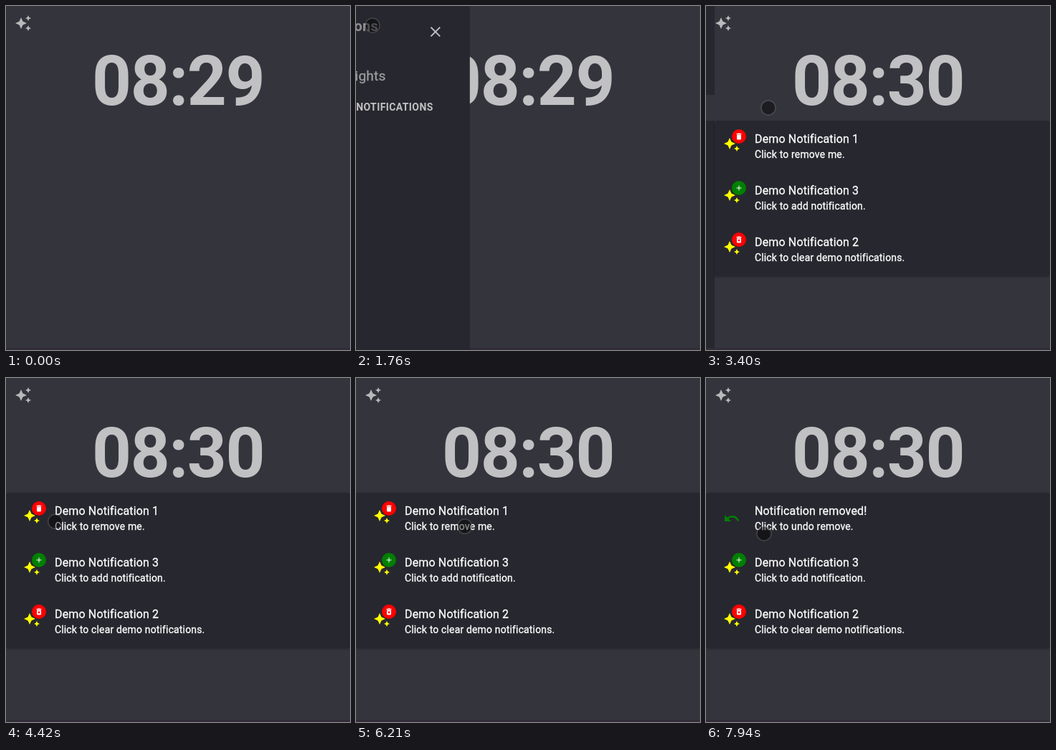
Recreate the animation shown at these times as an HTML page with a canvas. Size 480 by 480 pixels, loop 8000 ms.

```html
<!DOCTYPE html>
<html lang="en">
<head>
<meta charset="utf-8">
<title>Clock with notifications</title>
<style>
  html, body { margin: 0; width: 100%; height: 100%; overflow: hidden; background: #34343d; }
  canvas { display: block; width: 480px; height: 480px; }
</style>
</head>
<body>
<canvas id="stage" width="480" height="480"></canvas>
<script>
const ctx = document.getElementById('stage').getContext('2d');
const LOOP = 8000;
const BACK = '#34343d', PANEL = '#27272f', PALE = '#c1c1c3', GREEN = '#008000', RED = '#f00';
const ROW_TOP = 160, ROW_HEIGHT = 72, DRAWER = 300;

// Moments of the story in ms
const APPEAR = 200, OPEN = 1711, NEXT_MINUTE = 2160, CLOSE = 2800, LIST = 2900, SETTLED = 4070, REMOVED = 6450, PRESS = 6557;

const clamp = v => Math.max(0, Math.min(1, v));
const progress = (t, start, length) => clamp((t - start) / length);
const easeOut = (k, power = 3) => 1 - (1 - k) ** power;
const smooth = k => k * k * (3 - 2 * k);

function setFont(size, weight, spacing) {
  ctx.font = `${weight} ${size}px Roboto, sans-serif`;
  ctx.letterSpacing = spacing + 'px';
}

function text(str, x, y, size, weight, color, spacing = 0.15) {
  setFont(size, weight, spacing);
  ctx.fillStyle = ctx.strokeStyle = color;
  ctx.fillText(str, x, y);
  // Regular text gets a hairline so that it reads a little heavier
  if (weight === 400) {
    ctx.lineWidth = 0.3;
    ctx.strokeText(str, x, y);
  }
}

function centered(str, x, y, size, weight, color, spacing) {
  setFont(size, weight, spacing);
  text(str, x - ctx.measureText(str).width / 2, y, size, weight, color, spacing);
}

function box(x, y, w, h, r, color) {
  ctx.fillStyle = color;
  ctx.beginPath();
  ctx.roundRect(x, y, w, h, r);
  ctx.fill();
}

function disc(x, y, r, color) {
  ctx.fillStyle = color;
  ctx.beginPath();
  ctx.arc(x, y, r, 0, Math.PI * 2);
  ctx.fill();
}

function polygon(points, color) {
  ctx.fillStyle = color;
  ctx.beginPath();
  points.forEach(([x, y]) => ctx.lineTo(x, y));
  ctx.fill();
}

function sparkle(x, y, r, color) {
  const points = Array.from({ length: 8 }, (_, i) => {
    const reach = i % 2 ? r * 0.44 : r, angle = i * Math.PI / 4;
    return [x + reach * Math.cos(angle), y + reach * Math.sin(angle)];
  });
  polygon(points, color);
}

function cross(x, y, half, angle, color) {
  ctx.save();
  ctx.translate(x, y);
  ctx.rotate(angle);
  ctx.fillStyle = color;
  ctx.fillRect(-half, -1, half * 2, 2);
  ctx.fillRect(-1, -half, 2, half * 2);
  ctx.restore();
}

// Icons are drawn on a 24 unit grid
const icons = {
  stars(color) {
    sparkle(9, 12, 8, color);
    sparkle(19, 5, 4, color);
    sparkle(19, 19, 4, color);
  },
  close(color) { cross(12, 12, 9, Math.PI / 4, color); },
  add(color) { cross(12, 12, 7, 0, color); },
  remove(color) {
    box(6, 7, 12, 14, [0, 0, 2, 2], color);
    box(5, 4, 14, 2, 0, color);
    box(9, 3, 6, 1.5, 0, color);
  },
  clear(color) {
    icons.remove(color);
    cross(12, 14, 4, Math.PI / 4, RED);
  },
  undo(color) {
    polygon([[2, 7], [2, 16], [11, 16]], color);
    ctx.strokeStyle = color;
    ctx.lineWidth = 2.5;
    ctx.beginPath();
    ctx.arc(12.5, 18.2, 9, -0.74 * Math.PI, -0.09 * Math.PI);
    ctx.stroke();
  }
};

function icon(name, x, y, color, size = 24) {
  ctx.save();
  ctx.translate(x, y);
  ctx.scale(size / 24, size / 24);
  icons[name](color);
  ctx.restore();
}

const rows = [
  { title: 'Demo Notification 1', hint: 'Click to remove me.', symbol: 'remove', color: RED },
  { title: 'Demo Notification 3', hint: 'Click to add notification.', symbol: 'add', color: GREEN },
  { title: 'Demo Notification 2', hint: 'Click to clear demo notifications.', symbol: 'clear', color: RED }
];
const removed = { title: 'Notification removed!', hint: 'Click to undo remove.', symbol: 'undo', color: GREEN };

function drawRow({ title, hint, symbol, color }, y, t) {
  text(title, 68, y + 31, 16, 400, '#fff');
  text(hint, 68, y + 52, 14, 400, '#fff');
  if (symbol === 'undo') {
    ctx.globalAlpha = progress(t, REMOVED, 600);
    icon('undo', 24, y + 24, color);
    ctx.globalAlpha = 1;
    return;
  }
  icon('stars', 24, y + 20, '#ff0');
  disc(46, y + 22, 10, color);
  icon(symbol, 40, y + 16, '#fff', 12);
}

function ripple(t) {
  const k = progress(t, PRESS, 550);
  if (k === 0 || k === 1) return;
  ctx.save();
  ctx.beginPath();
  ctx.roundRect(0, ROW_TOP, 480, ROW_HEIGHT, [4, 4, 0, 0]);
  ctx.clip();
  disc(145, ROW_TOP + ROW_HEIGHT / 2, 336 * easeOut(k, 2), `rgba(120,120,115,${0.68 * (1 - k)})`);
  ctx.restore();
}

function notifications(t) {
  if (t < LIST) return;
  const left = t < SETTLED ? 12 : 0;
  ctx.save();
  ctx.translate(480 * (1 - easeOut(progress(t, LIST, 480))), 0);
  ctx.save();
  ctx.shadowColor = 'rgba(0,0,0,.3)';
  ctx.shadowBlur = 3;
  ctx.shadowOffsetY = 1;
  box(left, ROW_TOP, 480 - left, ROW_HEIGHT * 3 + 1, 4, PANEL);
  ctx.restore();
  ripple(t);
  rows.forEach((row, i) => {
    drawRow(i === 0 && t >= REMOVED ? removed : row, ROW_TOP + i * ROW_HEIGHT, t);
  });
  ctx.restore();
}

function drawer(t) {
  const open = easeOut(progress(t, OPEN, 225)) - smooth(progress(t, CLOSE, 195));
  if (t < 1760 || open <= 0) return;
  ctx.save();
  ctx.translate(DRAWER * (open - 1), 0);
  box(0, 0, DRAWER, 480, 0, PANEL);
  text('Demo Functions', 24, 35, 20, 700, '#8d8d92');
  icon('close', 240, 24, PALE);
  box(17, 89, 38, 18, 9, '#5f5f65');
  disc(26, 98, 13, '#fff');
  text('Office Lights', 72, 104, 19.2, 400, '#9c9ca0');
  centered('SHOW DEMO NOTIFICATIONS', DRAWER / 2, 146, 14, 700, PALE, 0.4);
  ctx.restore();
}

// Places the pointer visits, with the time of arrival
const stops = [
  { at: APPEAR, x: 358, y: 421 },
  { at: 590, x: 140, y: 174 },
  { at: 960, x: 24, y: 43 },
  { at: 1490, x: 23, y: 27 },
  { at: 2370, x: 87, y: 142 },
  { at: 4630, x: 62, y: 222 },
  { at: 5250, x: 119, y: 170 },
  { at: 5670, x: 160, y: 200 },
  { at: 6480, x: 146, y: 212 },
  { at: 6760, x: 145, y: 239 },
  { at: 7940, x: 81, y: 217 }
];

// Each glide takes at most 610 ms and ends on arrival
function pointerAt(t) {
  const i = stops.findIndex(stop => stop.at > t);
  if (i < 0) return stops[stops.length - 1];
  const from = stops[i - 1], to = stops[i];
  const length = Math.min(610, to.at - from.at);
  const k = smooth(progress(t, to.at - length, length));
  return { x: from.x + (to.x - from.x) * k, y: from.y + (to.y - from.y) * k };
}

function pointer(t) {
  if (t < APPEAR) return;
  const { x, y } = pointerAt(t);
  disc(x, y, 10, 'rgba(0,0,0,.45)');
  ctx.strokeStyle = 'rgba(255,255,255,.16)';
  ctx.lineWidth = 1.5;
  ctx.stroke();
}

function draw(t) {
  box(0, 0, 480, 480, 0, BACK);
  box(0, 477, 480, 3, 0, '#322c38');
  // A sliver of the drawer lingers at the left edge
  if (t >= CLOSE && t < SETTLED) {
    box(0, 0, 12, 124, 0, PANEL);
    box(0, ROW_TOP, 12, 317, 0, PANEL);
  }
  icon('stars', 12, 12, '#b9b9bb');
  centered(t < NEXT_MINUTE ? '08:29' : '08:30', 240, 137.5, 96, 700, PALE, -1.5);
  notifications(t);
  drawer(t);
  pointer(t);
}

function frame() {
  draw(performance.now() % LOOP);
  requestAnimationFrame(frame);
}
frame();
</script>
</body>
</html>
```
